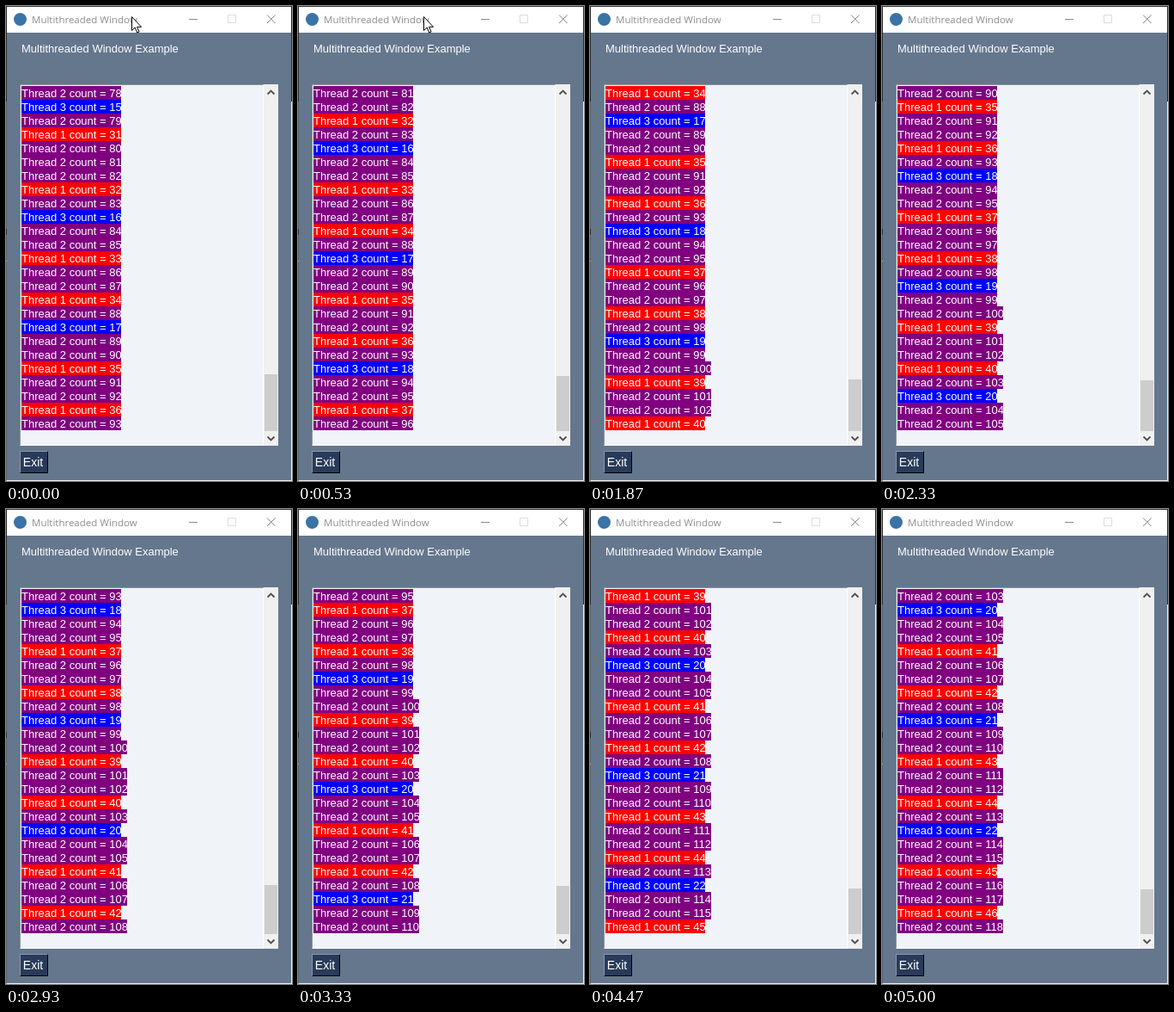
These frames come from a looping animation (333x552 px, 5.07 s). An HTML page:

```html
<!DOCTYPE html>
<html lang="en">
<head>
<meta charset="utf-8">
<title>Multithreaded Window</title>
<style>
  html, body { margin: 0; width: 100%; height: 100%; overflow: hidden; }
  body { position: relative; background: #64778d; color: #fff;
    font: 13px/17px "Liberation Sans", Arial, sans-serif; white-space: pre; }
  body div, svg { position: absolute; box-sizing: border-box; }
  #bar { left: 1px; top: 1px; width: 331px; height: 30px; background: #fff; }
  #icon { left: 9px; top: 8px; width: 15px; height: 15px; border-radius: 50%; background: #3a73a5; }
  #title { left: 30px; top: 7px; color: #8c8c8c; font: 11.5px/17px "Open Sans", sans-serif; }
  #label { left: 18px; top: 41px; }
  #box { left: 16px; top: 91px; width: 284px; height: 420px; background: #f0f3f7;
    border: 1px solid; border-color: #8e949b #fff #fff #8e949b; }
  #scroll { left: 300px; top: 91px; width: 17px; height: 420px; background: #f0f0f0; }
  #thumb { left: 301px; width: 15px; background: #cdcdcd; }
  .row { left: 18px; height: 16px; }
  #exit { left: 16px; top: 517px; width: 33px; height: 26px; padding-right: 2px; background: #283b5b;
    text-align: center; font-size: 14px; line-height: 25px;
    border: 1px solid; border-color: #8a98ad #000 #000 #8a98ad; }
  #edge { left: 0; top: 0; width: 333px; height: 552px;
    border: 1px solid; border-color: #3a3a3a #f0f0f0 #f0f0f0 #56636f; }
  .side { top: 0; width: 1px; height: 111px; background: #2e2e2e; }
</style>
</head>
<body>
<div id="edge"></div>
<div class="side" style="left:0"></div>
<div class="side" style="left:332px"></div>
<div class="side" style="left:0;top:259px;height:7px"></div>
<div class="side" style="left:0;top:296px;height:1px;background:#c8b060"></div>
<div id="bar"></div>
<div id="icon"></div>
<div id="title">Multithreaded Window</div>
<div id="label">Multithreaded Window Example</div>
<div id="box"></div>
<div id="scroll"></div>
<div id="thumb"></div>
<div id="exit">Exit</div>
<svg style="left:0;top:0" width="333" height="552" fill="none">
  <path d="M213 15.5h10" stroke="#8a8a8a"/>
  <path d="M258.500 10.500h9v9h-9z" stroke="#dcdcdc"/>
  <path d="M304 10.500l9.500 9.500M313.500 10.500l-9.500 9.500" stroke="#808080"/>
  <path d="M304.500 102.500l4-4 4 4M304.500 500.500l4 4 4-4" stroke="#505050" stroke-width="1.800"/>
  <path id="cursor" d="M146.500 12.500v16l3.700-3.500 2.500 6 2.400-1-2.500-5.700h5z" fill="#fff" stroke="#000"/>
</svg>
<script>
const LOOP = 5070, ROWS = 25, FIRST = 78, BASE = 147, CURSOR_OFF = 1670;
const colors = { 1: '#ff0000', 2: '#800080', 3: '#0000ff' };

// Arrival time of each new line
const arrivals = [
  70, 130, 330, 330, 530, 730, 870, 930, 1070, 1130,
  1330, 1400, 1530, 1730, 1870, 1930, 2070, 2130, 2330, 2400,
  2530, 2730, 2930, 2930, 3070, 3130, 3330, 3470, 3530, 3730,
  3870, 3930, 4130, 4200, 4400, 4470, 4600, 4800, 5000, 5000
];

// Thread 2 sets the beat; thread 1 takes about 2.5 beats, thread 3 takes 5
function buildLog(length) {
  const log = [];
  let one = 31;
  for (let n = FIRST; log.length < length; n++) {
    log.push([2, n]);
    if (n % 5 === 3) log.push([3, (n - 3) / 5]);
    if (n === Math.floor(85.005 + 2.51 * (one - 33))) log.push([1, one++]);
  }
  return log;
}

const log = buildLog(ROWS + arrivals.length);
const thumb = document.getElementById('thumb');
const cursor = document.getElementById('cursor');
const rows = Array.from({ length: ROWS }, (_, i) => {
  const row = document.createElement('div');
  row.className = 'row';
  row.style.top = 93 + 16 * i + 'px';
  return document.body.appendChild(row);
});

function setRow(row, [thread, count]) {
  row.textContent = `Thread ${thread} count = ${count}`;
  row.style.background = colors[thread];
  row.style.width = (count > 99 ? 123 : 116) + 'px';
}

let shown = -1;
function draw(t) {
  cursor.style.display = t < CURSOR_OFF ? '' : 'none';
  const added = arrivals.filter(a => a <= t).length;
  if (added === shown) return;
  shown = added;
  rows.forEach((row, i) => setRow(row, log[added + i]));
  const height = Math.round(9412 / (BASE + added) + 2);
  thumb.style.top = 494 - height + 'px';
  thumb.style.height = height + 'px';
}

const start = performance.now();
function tick() {
  draw((performance.now() - start) % LOOP);
  requestAnimationFrame(tick);
}
tick();
</script>
</body>
</html>
```
